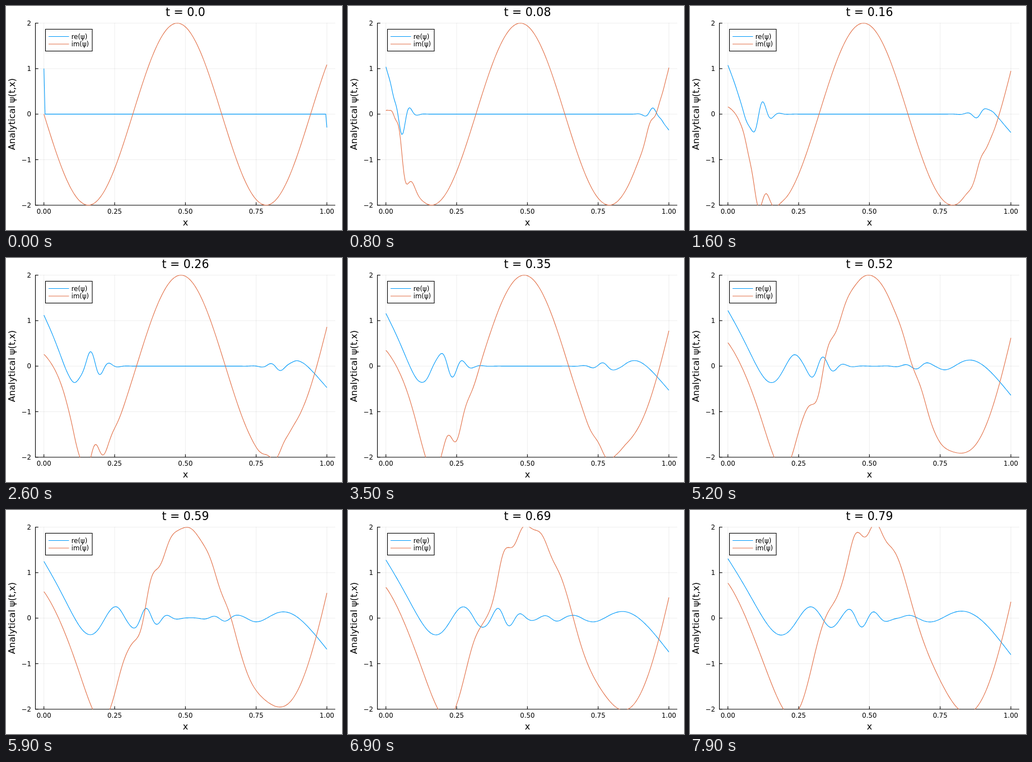
An HTML page that plays this animation: 600x400 px, repeating every 8 s.

```html
<!DOCTYPE html>
<html lang="en">
<head>
<meta charset="utf-8">
<title>Wave plot</title>
<style>
  html, body { margin: 0; width: 100%; height: 100%; overflow: hidden; background: #fff; }
  svg { display: block; width: 600px; height: 400px; }
  text { font-family: "DejaVu Sans", sans-serif; font-size: 11.7px; fill: #000; }
  .guide { font-size: 16.1px; text-anchor: middle; }
  #title { font-size: 20.5px; text-anchor: middle; }
  .grid { stroke: #000; stroke-opacity: .1; stroke-width: .7; }
  .axis { stroke: #000; stroke-width: 1.1; }
  .curve { fill: none; stroke-width: 1.1; stroke-linejoin: round; }
  .re { stroke: #009afa; }
  .im { stroke: #e26f46; }
</style>
</head>
<body>
<svg viewBox="0 0 600 400">
  <clipPath id="area"><rect x="52" y="30.2" width="536" height="325.8"/></clipPath>
  <g id="frame"></g>
  <text id="title" x="320.5" y="18.4"></text>
  <text class="guide" x="320.5" y="391.7">x</text>
  <text class="guide" transform="translate(16.4 193) rotate(-90)">Analytical ψ(t,x)</text>
  <g clip-path="url(#area)">
    <path id="re" class="curve re"/>
    <path id="im" class="curve im"/>
  </g>
  <rect x="70.5" y="41.5" width="83.5" height="39" fill="#fff" stroke="#000" stroke-width="1.1"/>
  <path class="curve re" d="M76 54.5H112.5"/>
  <path class="curve im" d="M76 68H112.5"/>
  <text x="116.7" y="59">re(ψ)</text>
  <text x="116.7" y="72.4">im(ψ)</text>
</svg>
<script>
const N = 250, FRAMES = 80, DT = 0.01;      // grid cells, time steps, step size
const D = 0.005, K = 10, OMEGA = 0.5;       // dispersion, wave number, frequency
const $ = id => document.getElementById(id);
const px = x => 67.7 + 505.3 * x;
const py = y => 193.1 - 81.25 * y;

function drawFrame() {
  let out = '';
  const line = (cls, x1, y1, x2, y2) => {
    out += `<line class="${cls}" x1="${x1}" y1="${y1}" x2="${x2}" y2="${y2}"/>`;
  };
  const label = (x, y, anchor, s) => {
    out += `<text x="${x}" y="${y}" text-anchor="${anchor}">${s}</text>`;
  };
  for (let i = 0; i <= 4; i++) {
    const x = px(i / 4), y = py(i - 2);
    line('grid', x, 30.5, x, 355.8);
    line('grid', 52.5, y, 588, y);
    line('axis', x, 355.8, x, 350.6);
    line('axis', 52.5, y, 57.7, y);
    label(x, 371.4, 'middle', (i / 4).toFixed(2));
    label(45, y + 4.3, 'end', String(i - 2).replace('-', '−'));
  }
  line('axis', 52.5, 30.3, 52.5, 356.3);
  line('axis', 52, 355.8, 588, 355.8);
  $('frame').innerHTML = out;
}

const theta = (x, t) => K * x - OMEGA * t;
const edge = (x, t) => Math.cos(theta(x, t)) - Math.sin(theta(x, t));

// Sine coefficient of the straight line joining the two edge values
const lift = (n, a, b) => (a - (n % 2 ? -b : b)) / N / Math.tan(n * Math.PI / 2 / N);

// Sine modes of the edge-driven dispersive waves, with an implicit
// integrator's phase lag and damping; its inner step grows with time.
function solveModes() {
  const G = 1 - Math.SQRT1_2, H = 1 - 2 * G;
  const frames = [];
  let re = new Float64Array(N), im = new Float64Array(N);
  for (let n = 1; n < N; n++) re[n] = -lift(n, edge(0, 0), edge(1, 0));
  frames.push({ re, im });
  for (let f = 1; f < FRAMES; f++) {
    const t = f * DT, tau = 0.063 * Math.pow(t - DT / 2, 0.3), part = DT / tau;
    const da = edge(0, t) - edge(0, t - DT), db = edge(1, t) - edge(1, t - DT);
    const r = new Float64Array(N), m = new Float64Array(N);
    for (let n = 1; n < N; n++) {
      const k = 2 * N * Math.sin(n * Math.PI / 2 / N), y = D * k * k * tau;
      const phase = part * (Math.atan(H * y) + 2 * Math.atan(G * y));
      const gain = Math.pow(Math.sqrt(1 + (H * y) ** 2) / (1 + (G * y) ** 2), part);
      const c = gain * Math.cos(phase), s = -gain * Math.sin(phase);
      const push = lift(n, da, db), half = Math.sqrt(gain);
      r[n] = re[n] * c - im[n] * s - push * half * Math.cos(phase / 2);
      m[n] = re[n] * s + im[n] * c + push * half * Math.sin(phase / 2);
    }
    frames.push({ re: re = r, im: im = m });
  }
  return frames;
}

const sine = Float64Array.from({ length: 2 * N }, (_, i) => Math.sin(Math.PI * i / N));
const modes = solveModes();

function drawCurves(f) {
  const t = f * DT, { re, im } = modes[f];
  const a = edge(0, t), b = edge(1, t);
  const rePts = [], imPts = [];
  for (let j = 0; j <= N; j++) {
    const x = j / N;
    let u = a + (b - a) * x, v = -2 * Math.sin(theta(x, t));
    for (let n = 1; n < N; n++) {
      const s = sine[n * j % (2 * N)];
      u += re[n] * s;
      v += im[n] * s;
    }
    rePts.push(px(x).toFixed(2) + ' ' + py(u).toFixed(2));
    imPts.push(px(x).toFixed(2) + ' ' + py(v).toFixed(2));
  }
  $('re').setAttribute('d', 'M' + rePts.join('L'));
  $('im').setAttribute('d', 'M' + imPts.join('L'));
  $('title').textContent = 't = ' + (f ? f / 100 : '0.0');
}

let shown = -1;
const start = performance.now();
function tick() {
  const f = Math.floor((performance.now() - start) / 100) % FRAMES;
  if (f !== shown) drawCurves(shown = f);
  requestAnimationFrame(tick);
}
drawFrame();
tick();
</script>
</body>
</html>
```
